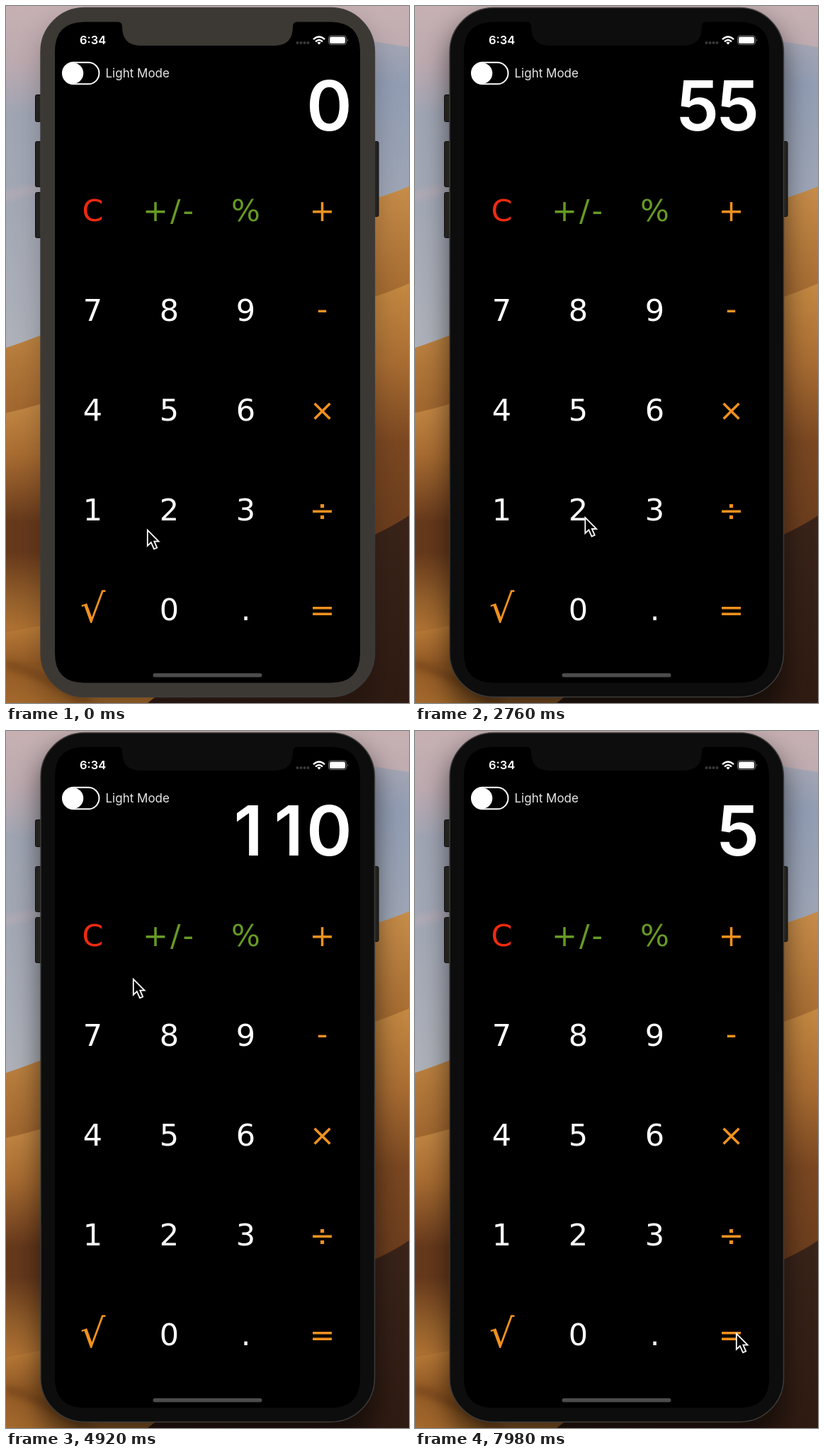
Animation of 569x985 px, one loop 8 s. Source, as an HTML page:

```html
<!DOCTYPE html>
<html lang="en">
<head>
<meta charset="utf-8">
<title>Calculator</title>
<style>
  html, body { margin: 0; width: 100%; height: 100%; overflow: hidden; background: #000; }
  svg { display: block; width: 100%; height: 100%; }
  text { fill: #fff; font-family: Inter, sans-serif; }
  #keys text { font: 43px "DejaVu Sans", sans-serif; text-anchor: middle; }
  #display text { font-size: 98px; font-weight: 600; text-anchor: middle; }
</style>
</head>
<body>
<svg viewBox="0 0 569 985" preserveAspectRatio="none">
  <defs>
    <linearGradient id="sky" x2="0" y2="1">
      <stop offset="0" stop-color="#c6b0b2"/>
      <stop offset=".16" stop-color="#bcaab0"/>
      <stop offset=".29" stop-color="#a0a5b3"/>
      <stop offset=".55" stop-color="#a3a8b5"/>
      <stop offset="1" stop-color="#b0b3ba"/>
    </linearGradient>
    <linearGradient id="skyRight" x2="0" y2="1">
      <stop offset="0" stop-color="#a5a6b4"/>
      <stop offset=".25" stop-color="#929db3"/>
      <stop offset="1" stop-color="#a0a7b6"/>
    </linearGradient>
    <linearGradient id="leftFar" x2="0" y2="1">
      <stop offset="0" stop-color="#bd8341"/>
      <stop offset=".2" stop-color="#a26830"/>
      <stop offset="1" stop-color="#a0662c"/>
    </linearGradient>
    <linearGradient id="leftNear" x2="0" y2="1">
      <stop offset="0" stop-color="#c48945"/>
      <stop offset=".18" stop-color="#a76b31"/>
      <stop offset=".4" stop-color="#66391c"/>
      <stop offset=".5" stop-color="#66391c"/>
      <stop offset=".66" stop-color="#95602b"/>
      <stop offset=".75" stop-color="#ad7032"/>
      <stop offset="1" stop-color="#8d5522"/>
    </linearGradient>
    <linearGradient id="leftFoot" x2="0" y2="1">
      <stop offset="0" stop-color="#bb7d38"/>
      <stop offset=".5" stop-color="#935a26"/>
      <stop offset="1" stop-color="#a2682c"/>
    </linearGradient>
    <linearGradient id="rightFar" x2="0" y2="1">
      <stop offset="0" stop-color="#c68c49"/>
      <stop offset=".2" stop-color="#a66c32"/>
      <stop offset="1" stop-color="#98602b"/>
    </linearGradient>
    <linearGradient id="rightNear" x2="0" y2="1">
      <stop offset="0" stop-color="#c48942"/>
      <stop offset=".28" stop-color="#a86c32"/>
      <stop offset=".55" stop-color="#7a4721"/>
      <stop offset="1" stop-color="#65391c"/>
    </linearGradient>
    <linearGradient id="shade" x2="0" y2="1">
      <stop offset="0" stop-color="#3a241a"/>
      <stop offset="1" stop-color="#2f1b12"/>
    </linearGradient>
    <filter id="blur" x="-20%" y="-20%" width="140%" height="140%"><feGaussianBlur stdDeviation="18"/></filter>
    <filter id="soft" x="-50%" y="-100%" width="200%" height="300%"><feGaussianBlur stdDeviation="5"/></filter>
  </defs>

  <rect width="569" height="520" fill="url(#sky)"/>
  <path d="M505 48 L569 58 V300 H505Z" fill="url(#skyRight)"/>
  <path d="M-10 266 Q20 258 60 252 L60 259 Q20 268 -10 276Z" fill="#c0adb6" opacity=".6" filter="url(#soft)"/>
  <path d="M0 483 Q25 475 60 461 V985 H0Z" fill="url(#leftFar)"/>
  <path d="M0 575 Q25 570 60 559 V985 H0Z" fill="url(#leftNear)"/>
  <path d="M0 885 L60 874 L260 985 H0Z" fill="url(#leftFoot)"/>
  <path d="M0 925 Q70 940 130 985 H100 Q50 950 0 937Z" fill="#704019" opacity=".55" filter="url(#soft)"/>
  <path d="M505 277 Q540 267 569 255 V985 H505Z" fill="url(#rightFar)"/>
  <path d="M505 416 Q540 405 569 392 V800 H505Z" fill="url(#rightNear)"/>
  <path d="M200 985 L480 765 Q540 740 569 720 V985Z" fill="url(#shade)"/>

  <rect id="shadow" x="46" y="18" width="477" height="990" rx="62" filter="url(#blur)"/>

  <g fill="#24221f" stroke="#0d0d0d" stroke-width="1">
    <rect x="41.5" y="125.5" width="10" height="38" rx="2"/>
    <rect x="41.5" y="191.5" width="10" height="64" rx="2"/>
    <rect x="41.5" y="263.5" width="10" height="64" rx="2"/>
    <rect x="516" y="191.5" width="10" height="106" rx="2"/>
  </g>
  <rect id="bezel" x="49" y="2.5" width="471.5" height="974" rx="62" stroke="#3c3c3b" stroke-width="1.4"/>
  <path d="M111 22.500H158Q164 22.500 164 29Q164 56 190 56H379Q405 56 405 29Q405 22.500 411 22.500H458Q500 22.500 500 64.500V914.500Q500 956.500 458 956.500H111Q69 956.500 69 914.500V64.500Q69 22.500 111 22.500Z"/>

  <text x="104" y="54" font-size="16.500" font-weight="600">6:34</text>
  <path d="M411.500 52h15.100" stroke="#3a3a3a" stroke-width="4" stroke-linecap="round" stroke-dasharray="0 5"/>
  <g fill="none" stroke="#fff" stroke-width="2.400">
    <path d="M434 47.200Q442 39.800 450 47.200M437 50.400Q442 45.800 447 50.400"/>
    <path d="M442 54.500L439.300 51.800Q442 49.600 444.700 51.800Z" fill="#fff" stroke="none"/>
  </g>
  <rect x="455.500" y="42" width="25" height="12.500" rx="3.500" fill="none" stroke="#777"/>
  <rect x="457" y="43.500" width="22" height="9.500" rx="2.200" fill="#fff"/>
  <path d="M482 46.300Q484 48.200 482 50.200Z" fill="#777"/>

  <rect x="80" y="79.800" width="51.500" height="30.500" rx="15.250" fill="none" stroke="#fff" stroke-width="2"/>
  <circle cx="94.500" cy="95" r="14.800" fill="#fff"/>
  <text x="140.500" y="101" font-size="17" style="fill:#e6e6e6">Light Mode</text>

  <g id="display"></g>
  <g id="keys"></g>
  <rect x="207.500" y="943" width="154" height="5.500" rx="2.750" fill="#4c4c4c"/>
  <path id="cursor" d="M.8 2.700V24.800L5.800 20L10 29.400L14.200 27.600L10.300 18.700H16.600Z" stroke="#fff" stroke-width="1.800"/>
</svg>
<script>
const LOOP = 8000, FOCUS = 890, SHOW_DELAY = 60, HOLD = 110, FADE = 260;
const byId = id => document.getElementById(id);

function addText(parent, string, x, y) {
  const node = document.createElementNS('http://www.w3.org/2000/svg', 'text');
  node.textContent = string;
  node.setAttribute('x', x);
  node.setAttribute('y', y);
  return parent.appendChild(node);
}

const colors = { C: '#ee2a10', '+/-': '#679a24', '%': '#679a24' };
const shiftY = { '-': -2.5, '√': 3.5 };
const rows = ['C +/- % +', '7 8 9 -', '4 5 6 ×', '1 2 3 ÷', '√ 0 . ='];
const keys = {};
rows.forEach((row, r) => row.split(' ').forEach((label, c) => {
  const y = 304.3 + 140.8 * r + (shiftY[label] || 0);
  const key = addText(byId('keys'), label, 122.5 + 108 * c, y);
  key.style.fill = colors[label] || (c === 3 || label === '√' ? '#f0911f' : '#fff');
  if (label === '+/-') key.style.letterSpacing = '3px';
  if (label === '√') key.style.fontSize = '56px';
  keys[label] = key;
}));

// time, key, and the number shown after release
const presses = [
  [890, '5', '5'], [1260, '5', '55'], [2020, '×'], [2900, '2', '2'],
  [3960, '=', '110'], [6180, '÷'], [7040, '5', '5']
];

// time, x, y of the pointer tip
const path = [
  [0, 199, 738], [300, 199, 738], [840, 237, 583], [1380, 237, 583],
  [1800, 432, 591], [1980, 445, 580], [2200, 445, 580],
  [2800, 237, 722], [3100, 237, 722], [3660, 456, 795],
  [3860, 452, 851], [4150, 452, 851], [4860, 179, 348], [5300, 179, 348],
  [6080, 450, 716], [6320, 450, 716], [6900, 229, 563], [7200, 229, 563],
  [7860, 453, 849], [LOOP, 453, 849]
];

function pointerAt(t) {
  const i = path.findIndex(p => p[0] > t);
  const [t0, x0, y0] = path[i - 1], [t1, x1, y1] = path[i];
  const u = (t - t0) / (t1 - t0), e = u * u * (3 - 2 * u);
  return [x0 + (x1 - x0) * e, y0 + (y1 - y0) * e];
}

let shown = null;
function showNumber(value) {
  if (value === shown) return;
  shown = value;
  byId('display').replaceChildren();
  [...value].reverse().forEach((digit, i) => addText(byId('display'), digit, 456.3 - 57 * i, 175.8));
}

function draw(t) {
  let value = '0';
  for (const label in keys) keys[label].style.opacity = 1;
  for (const [start, label, result] of presses) {
    const age = t - start;
    if (age < 0) break;
    if (result && age >= SHOW_DELAY) value = result;
    const recovered = Math.min(1, Math.max(0, (age - HOLD) / FADE));
    keys[label].style.opacity = 0.18 + 0.82 * recovered;
  }
  showNumber(value);

  const focused = t >= FOCUS;
  byId('bezel').setAttribute('fill', focused ? '#0d0d0d' : '#3c3935');
  byId('shadow').setAttribute('opacity', focused ? 0.5 : 0.2);
  byId('cursor').setAttribute('transform', `translate(${pointerAt(t)})`);
}

const began = performance.now();
function tick() {
  draw((performance.now() - began) % LOOP);
  requestAnimationFrame(tick);
}
tick();
</script>
</body>
</html>
```
